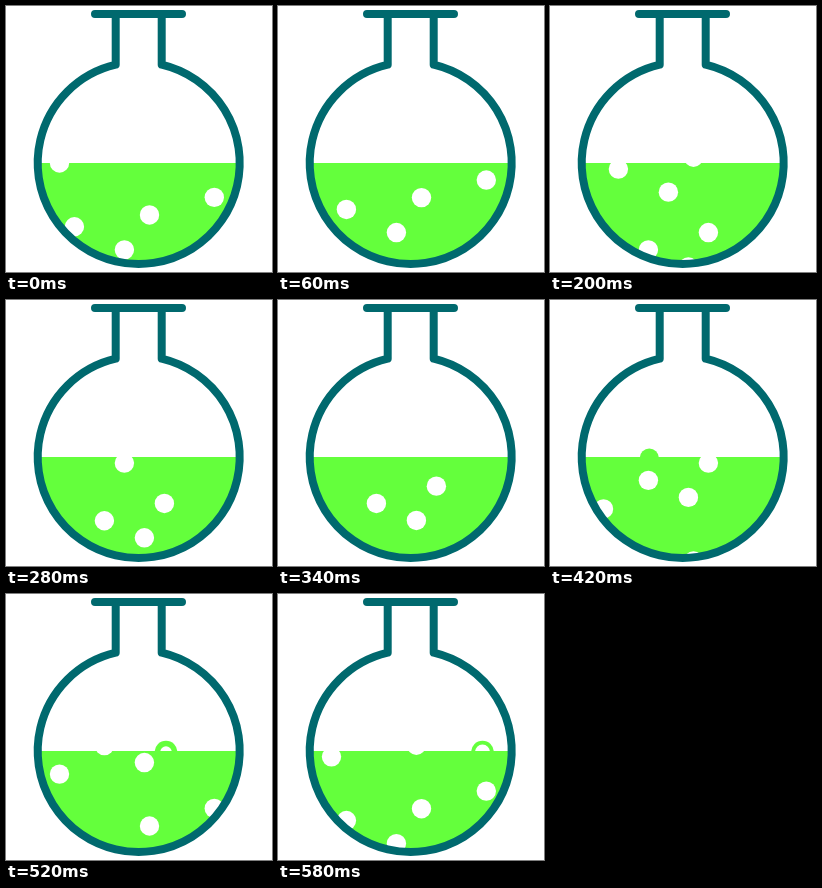
Recreate the animation shown at these times as an HTML page with a canvas. Size 266 by 266 pixels, loop 0.6 s.

```html
<!DOCTYPE html>
<html lang="en">
<head>
<meta charset="utf-8">
<title>Bubbling flask</title>
<style>
  html, body { margin: 0; width: 100%; height: 100%; overflow: hidden; background: #fff; }
  canvas { display: block; width: 266px; height: 266px; }
</style>
</head>
<body>
<canvas id="stage" width="266" height="266"></canvas>
<script>
const ctx = document.getElementById('stage').getContext('2d');
const LOOP = 600, STEP = 20, TAU = Math.PI * 2;
const TEAL = '#00696e', GREEN = '#64ff3c', WHITE = '#fff';
const flask = { x: 132.7, y: 157, r: 101 };
const SURFACE = 157, RISE = 0.2885, BUBBLE_R = 9.7, POP_TIME = 80;

// x position and the moment the centre reaches the surface
const bubbles = [
  [53.5, 0], [208.3, 119], [143.5, 180], [68.4, 221],
  [118.4, 301], [158.4, 441], [98.4, 501], [138.4, 560]
];
// x position and start time of each bursting dome
const pops = [[57.3, 88], [99.3, 400], [160, 468], [204.5, 520]];

const mod = (a, n) => ((a % n) + n) % n;

function disc(x, y, r, color) {
  ctx.fillStyle = color;
  ctx.beginPath();
  ctx.arc(x, y, r, 0, TAU);
  ctx.fill();
}

function drawLiquid() {
  ctx.fillStyle = GREEN;
  ctx.beginPath();
  ctx.arc(flask.x, flask.y, flask.r, 0, Math.PI);
  ctx.fill();
}

function drawBubbles(t) {
  for (const [x, surfaced] of bubbles) {
    const age = mod(t - surfaced + 450, LOOP) - 450;
    disc(x, SURFACE - RISE * age, BUBBLE_R, WHITE);
  }
}

function drawPops(t) {
  ctx.save();
  ctx.beginPath();
  ctx.rect(0, 0, 266, SURFACE);
  ctx.clip();
  for (const [x, start] of pops) {
    const p = mod(t - start, LOOP) / POP_TIME;
    if (p >= 1) continue;
    disc(x, SURFACE + 1, 11.3 * Math.min(1, p / 0.3), GREEN);
    if (p > 0.3) disc(x, SURFACE + 1, 16.5 * (p - 0.3), WHITE);
  }
  ctx.restore();
}

function drawFlask() {
  const halfGap = 23, neckL = flask.x - halfGap, neckR = flask.x + halfGap;
  const tilt = Math.asin(halfGap / flask.r);
  ctx.strokeStyle = TEAL;
  ctx.lineWidth = 8;
  ctx.lineCap = ctx.lineJoin = 'round';
  ctx.beginPath();
  ctx.moveTo(neckR, 8);
  ctx.arc(flask.x, flask.y, flask.r, tilt - Math.PI / 2, TAU - Math.PI / 2 - tilt);
  ctx.lineTo(neckL, 8);
  ctx.moveTo(89, 8);
  ctx.lineTo(176, 8);
  ctx.stroke();
}

function frame() {
  const t = Math.floor((performance.now() % LOOP) / STEP) * STEP;
  ctx.fillStyle = WHITE;
  ctx.fillRect(0, 0, 266, 266);
  drawLiquid();
  drawBubbles(t);
  drawPops(t);
  drawFlask();
  requestAnimationFrame(frame);
}
frame();
</script>
</body>
</html>
```
